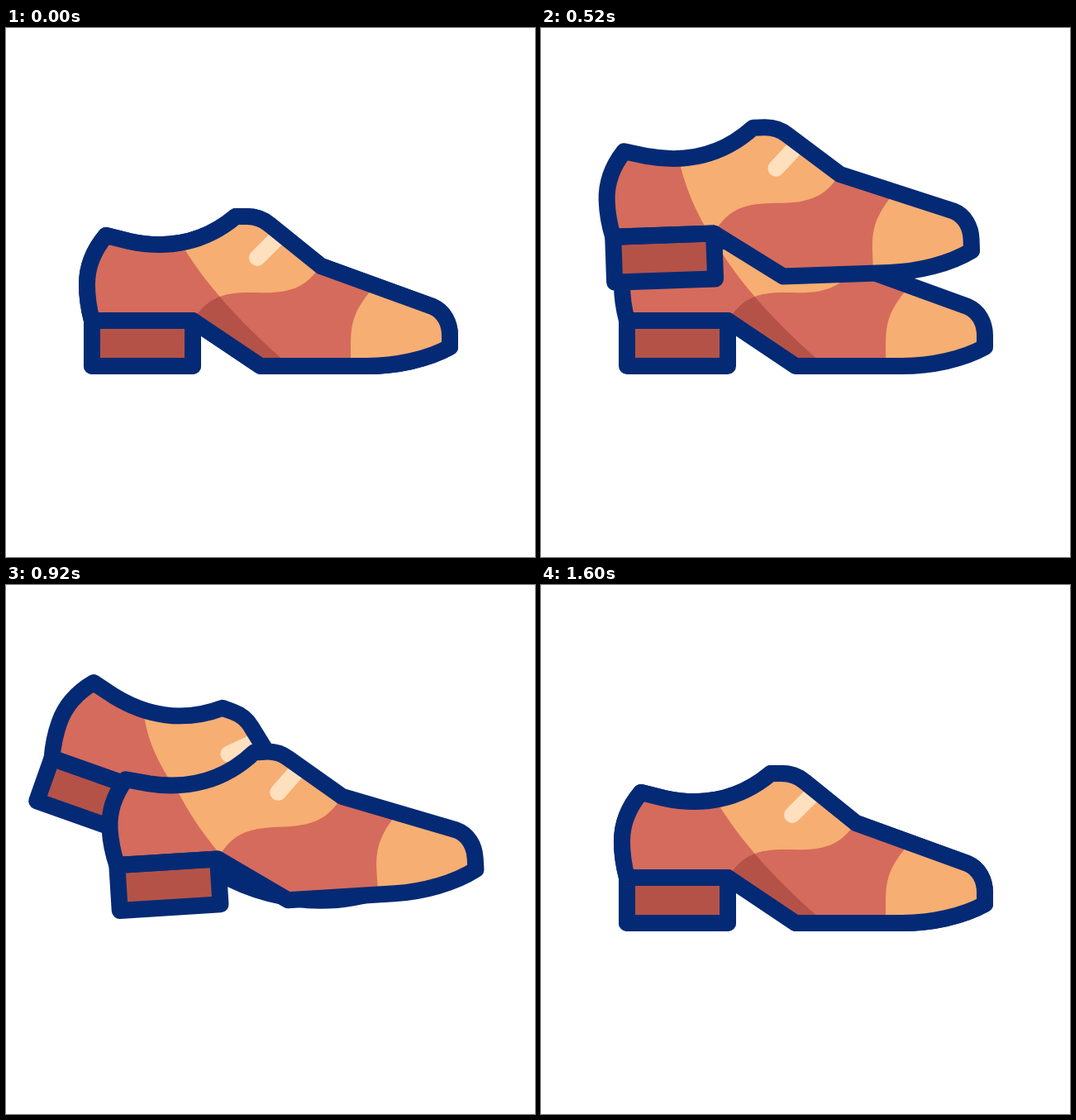
These frames come from a looping animation (640 px wide and 640 px high, 1800 ms). An HTML page with a canvas:

```html
<!DOCTYPE html>
<html lang="en">
<head>
<meta charset="utf-8">
<title>Walking shoes</title>
<style>
  html, body { margin: 0; width: 100%; height: 100%; overflow: hidden; background: #fff; }
  canvas { display: block; width: 640px; height: 640px; }
</style>
</head>
<body>
<canvas id="stage" width="640" height="640"></canvas>
<script>
const ctx = document.getElementById('stage').getContext('2d');
const LOOP = 1800, STEP = 1040, DELAY = 560;
const NAVY = '#042a75', RED = '#d56b5c', DARK = '#b55248', ORANGE = '#f6ae72', SHINE = '#fee0be';
const PIVOT = [121, 251];

// time, pivot x, pivot y, rotation, panel slide at the collar, panel slide at the heel
const KEYS = [
  [0, 121, 251, 0, 0, 0],
  [180, 101, 180, 15.6, 0, 0],
  [280, 102, 137, 20.3, -10, -14],
  [360, 106, 118, 19.6, -24, -35],
  [520, 100.5, 149, -1.9, -28, -61],
  [580, 111, 164, -9.1, -36, -79],
  [740, 158, 188, -9.1, -72, -106],
  [920, 145, 235, -3.6, -34, -50],
  [STEP, 121, 251, 0, 0, 0]
];

function slope(i, col) {
  const before = KEYS[i - 1], after = KEYS[i + 1];
  return before && after ? (after[col] - before[col]) / (after[0] - before[0]) : 0;
}

// Smooth cubic through the keys
function poseAt(time) {
  const t = Math.min(Math.max(time, 0), STEP);
  let i = 0;
  while (i < KEYS.length - 2 && t > KEYS[i + 1][0]) i++;
  const a = KEYS[i], b = KEYS[i + 1], span = b[0] - a[0];
  const u = (t - a[0]) / span, v = 1 - u;
  return [1, 2, 3, 4, 5].map(c =>
    v * v * (1 + 2 * u) * a[c] + u * u * (3 - 2 * u) * b[c] +
    span * u * v * (v * slope(i, c) - u * slope(i + 1, c)));
}

function fill(path, color) {
  ctx.fillStyle = color;
  ctx.fill(path);
}

function drawShoe(time) {
  const [x, y, angle, slideTop, slideHeel] = poseAt(time);
  const bend = Math.max(0, angle) / 17;
  const p = (px, py, dx = 0, dy = 0) => `${px + dx * bend} ${py + dy * bend} `;
  const s = (px, py, dx = 0, dy = 0) =>
    p(px + slideTop + (slideHeel - slideTop) * (py - 267) / 78, py, dx, dy);

  const body = new Path2D(
    'M121 251 L149 258 C195 268 240 260 278 228 L291 228 C301 228 311 231 319 238' +
    'L381 288 L' + p(516, 337, -5, -10) +
    'C' + p(530, 343, -3, -12) + p(537, 357, 0, -15) + p(537, 372, 2, -16) +
    'L' + p(537, 386, 3, -17) +
    'C' + p(510, 401, 0, -9) + p(472, 409, 3, 0) + p(437, 409, 1, 6) +
    'C' + p(395, 409, 0, 14) + p(350, 409, 0, 12) + '308 409' +
    'L226 354 L104 354 C101 343 98 330 98 310 C98 290 105 270 121 251 Z');
  const panel = new Path2D(
    'M' + s(207, 253) + 'C' + s(235, 300, -2) + s(270, 345, 10, 5) + s(345, 410, 87, 2) +
    'L300 440 L60 440 L60 220 Z');
  const vamp = new Path2D(
    'M226 354 C245 324 265 319 303 320 C345 322 362 312 376 294' +
    'L381 270 L580 270 L580 440 L300 440 Z');
  const cap = new Path2D(
    'M' + p(446, 312, -3, -3) + 'C' + p(424, 338, 0, -2) + p(417, 352, 4, 0) + p(417, 382, 5, 0) +
    'L' + p(417, 409, 9, 6) + 'L580 440 L580 290 Z');
  const shine = new Path2D('M304 278 L340 242');
  const heel = new Path2D('M104 354 H226 V409 H104 Z');

  ctx.save();
  ctx.translate(x, y);
  ctx.rotate(angle * Math.PI / 180);
  ctx.translate(-PIVOT[0], -PIVOT[1]);
  ctx.lineWidth = 20;
  ctx.lineJoin = ctx.lineCap = 'round';

  ctx.save();
  ctx.clip(body);
  fill(body, ORANGE);
  fill(panel, RED);
  fill(vamp, RED);
  ctx.save();
  ctx.clip(vamp);
  fill(panel, DARK);
  ctx.restore();
  fill(cap, ORANGE);
  ctx.strokeStyle = SHINE;
  ctx.stroke(shine);
  ctx.restore();

  fill(heel, DARK);
  ctx.strokeStyle = NAVY;
  ctx.stroke(heel);
  ctx.stroke(body);
  ctx.restore();
}

function draw() {
  const t = performance.now() % LOOP;
  ctx.fillStyle = '#fff';
  ctx.fillRect(0, 0, 640, 640);
  drawShoe(t - DELAY);
  drawShoe(t);
  requestAnimationFrame(draw);
}
draw();
</script>
</body>
</html>
```
